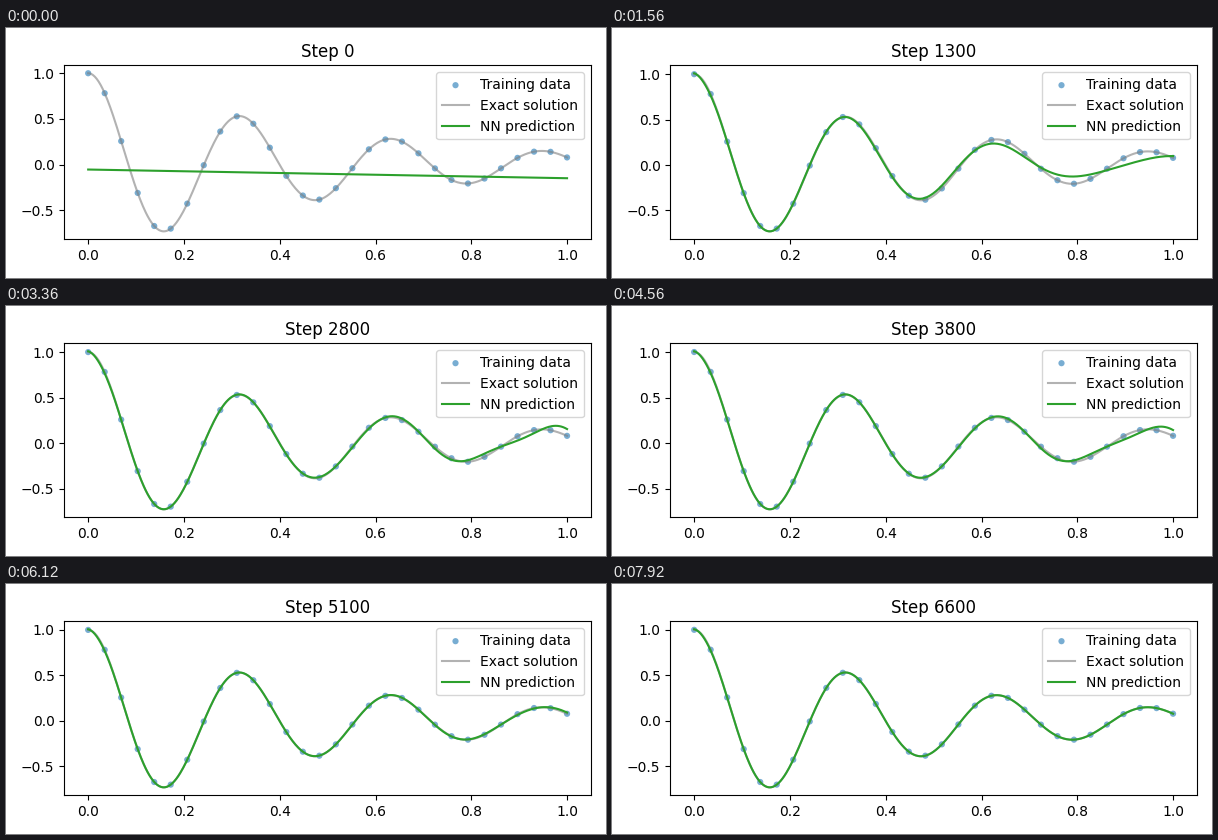
Write a matplotlib script that moves like this. It is 600 px wide and 250 px high and loops after 8 s.

```python
import numpy as np
import matplotlib.pyplot as plt
from matplotlib.animation import FuncAnimation

DAMP, W0 = 2.0, 20.0
OMEGA = np.sqrt(W0**2 - DAMP**2)
INTERVAL, FRAMES = 40, 200
TICKS_PER_STEP = 3
COARSE, FINE, LAST = 700, 1300, 6600  # steps that bound the training phases


def exact(x):
    """Under-damped oscillator released from rest at 1."""
    wave = np.cos(OMEGA * x) + DAMP / OMEGA * np.sin(OMEGA * x)
    return np.exp(-DAMP * x) * wave


def smooth(u):
    u = np.clip(u, 0, 1)
    return u * u * (3 - 2 * u)


def ease_out(u, k=3.0):
    return (1 - np.exp(-k * np.clip(u, 0, 1))) / (1 - np.exp(-k))


def lerp(a, b, u):
    return a + (b - a) * u


x = np.linspace(0, 1, 500)
x_data = np.linspace(0, 1, 30)
y_exact, y_data = exact(x), exact(x_data)


def early_fit(step):
    """A straight line turning into a strongly damped chirp."""
    u = step / COARSE
    line = -.053 - .095 * x
    decay, freq, chirp = lerp(8, 5.5, u), lerp(7, 19.8, smooth(u)), 7.5 * u
    wave = 1.07 * np.exp(-decay * x) * np.cos(freq * x - chirp * x**2)
    return lerp(line, wave + .058 * x**6, ease_out(u, 1.5))


def ripple(amp, reach, power, centre, length):
    """Error wave that grows towards the right end."""
    envelope = amp * np.exp(-((1 - x) / reach)**power)
    return envelope * np.cos(2 * np.pi * (x - centre) / length)


wide = ripple(.1, .45, 2, .785, .275)
narrow = ripple(.08, .22, 1, .82, .17)


def late_fit(step):
    """Exact curve plus the errors that training has not removed yet."""
    wide_left = 1 - ease_out((step - FINE) / 1500)
    narrow_left = np.interp(step, [FINE, 2800, 3800, 5100, LAST], [0, 1, .85, .18, 0])
    r = x / .025
    start = np.interp(step, [FINE, LAST], [.04, .025]) * (.25 - r) * np.exp(-r * r / 2)
    return y_exact + start + wide_left * wide + narrow_left * narrow


def predict(step):
    if step <= COARSE:
        return early_fit(step)
    # the fit spreads from left to right
    u = (step - COARSE) / (FINE - COARSE)
    return lerp(early_fit(COARSE), late_fit(step), smooth(1.8 * u - .8 * x))


fig, ax = plt.subplots(figsize=(6, 2.5), dpi=100)
ax.scatter(x_data, y_data, s=20, color="tab:blue", alpha=.6,
           edgecolors="none", label="Training data")
ax.plot(x, y_exact, color="tab:gray", alpha=.6, label="Exact solution")
pred, = ax.plot(x, predict(0), color="tab:green", label="NN prediction")
title = ax.set_title("Step 0")
ax.legend(loc="upper right")
fig.tight_layout()


def update(k):
    step = k // TICKS_PER_STEP * 100
    y = predict(step)
    pred.set_ydata(y)
    title.set_text(f"Step {step}")
    lo, hi = min(y.min(), y_exact.min()), max(y.max(), y_exact.max())
    pad = .05 * (hi - lo)
    ax.set_ylim(lo - pad, hi + pad)
    return pred, title


anim = FuncAnimation(fig, update, frames=FRAMES, interval=INTERVAL,
                     repeat=True, repeat_delay=0, blit=False)
plt.show()
```
